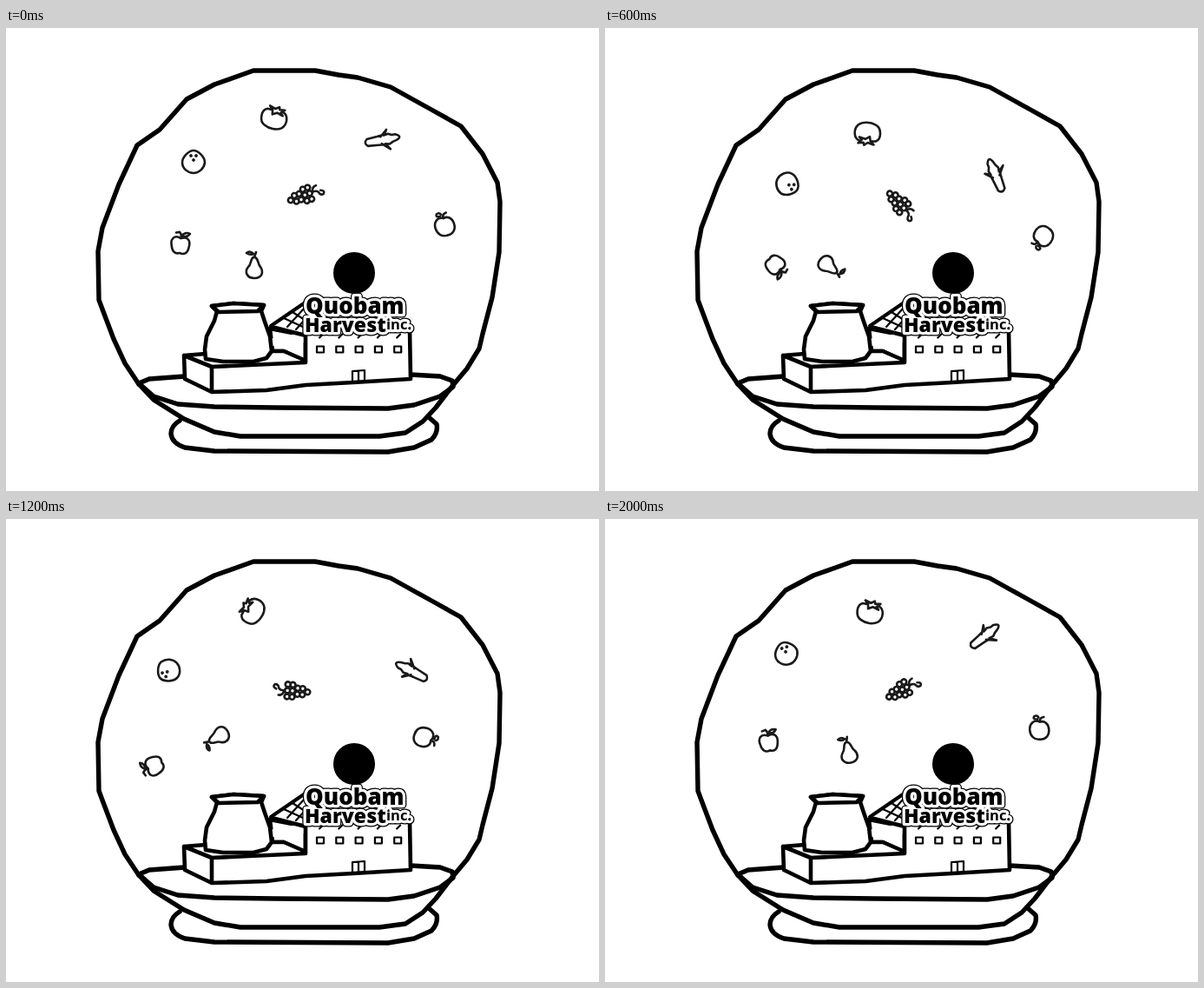
Recreate the animation shown at these times as an HTML page. Size 683 by 533 pixels, loop 2.2 s.

```html
<!DOCTYPE html>
<html lang="en">
<head>
<meta charset="utf-8">
<title>Snow globe</title>
<style>
  html, body { margin: 0; width: 100%; height: 100%; overflow: hidden; background: #fff; }
  svg { display: block; width: 100%; height: 100%; fill: none; stroke: #000;
        stroke-linecap: round; stroke-linejoin: round; }
  .globe { stroke-width: 5.4; }
  .factory { stroke-width: 4.6; fill: #fff; }
  .detail { stroke-width: 2.2; }
  .fruit { stroke-width: 2.6; stroke: #1a1a1a; }
  .sign { font: 800 26px "Open Sans", sans-serif; }
  .halo { stroke-width: 9; }
  .gap { stroke: #fff; stroke-width: 6.5; }
  .ink { stroke: none; fill: #000; }
</style>
</head>
<body>
<svg viewBox="0 0 683 533">
  <g class="globe">
    <path d="M153 410L137 386L124 358L113 329L107 313L106 257L111 230L130 180L151 135L177 117L208 82L240 65L285 49H356L383 54L405 57L443 68L490 94L524 113L549 145L566 178L569 200L568 258L560 310L549 352L545 369L531 392L515 411"/>
    <path d="M206 401L165 404L153 409L170 424L198 433L240 436L310 437L440 438L470 434L500 424L515 413L514 406L500 401L466 399"/>
    <path d="M153 410L170 428L205 450L240 465L270 470H430L460 466L480 453L495 437L515 411"/>
    <path d="M200 452Q190 458 190 467Q191 478 206 483L240 487L440 488L470 483L490 474Q498 466 496 456L488 449"/>
  </g>

  <g class="factory">
    <path d="M304 346L345 354V384L320 372H307Z"/>
    <path d="M205 377L230 374L308 372H320L345 384V350H465V404L400 408L345 410L300 417L237 419L206 404Z" stroke="none"/>
    <path d="M230 375L205 377L206 404L237 419L300 417L345 411L400 408L466 404L465 348M345 350V385L237 390L205 377M237 390V419M307 372H320L343 382M304 346L310 345L345 354"/>
    <path d="M243 326L240 337L231 355L229 370L230 381L250 384H285L300 380L306 372L304 355L298 338L294 326L297 319L262 317L237 320Z"/>
    <path d="M237 320L262 317L297 319L290 326L245 327Z"/>
  </g>
  <g class="detail">
    <path d="M305 343L343 317" stroke-width="4"/>
    <path d="M320 334L344 345M330 327L344 336M324 344L344 322M334 347L344 336"/>
    <path d="M399 407V395L413 394V406M406 395V407"/>
    <path id="windows"/>
  </g>

  <defs>
    <g id="lettering" class="sign">
      <text x="345" y="329">Quobam</text>
      <text x="344" y="350" font-size="23">Harvest</text>
      <text x="438" y="347" font-size="16.5" font-weight="700">inc.</text>
    </g>
  </defs>
  <use href="#lettering" class="halo"/>
  <use href="#lettering" class="gap"/>
  <use href="#lettering" class="ink"/>
  <circle class="ink" cx="401" cy="282" r="24"/>
  <g id="produce" class="fruit"></g>
</svg>
<script>
  const STEP_MS = 200, STEPS = 11;

  const dot = (x, y, r) => `M${x - r} ${y}a${r} ${r} 0 1 0 ${2 * r} 0a${r} ${r} 0 1 0 ${-2 * r} 0`;

  // A square window with a short tick above it, five times.
  let windows = '';
  for (let i = 0; i < 5; i++) windows += `M${358 + 22.3 * i} 366.5h8v7h-8zm3-10l4-4`;
  document.getElementById('windows').setAttribute('d', windows);

  function bunch() {
    let berries = '';
    [3, 3, 2, 2, 1].forEach((count, row) => {
      for (let i = 0; i < count; i++) berries += dot(7 * (i - (count - 1) / 2), 5.8 * row - 5, 3);
    });
    return berries;
  }

  const easeOut = power => u => 1 - (1 - u) ** power;
  const smooth = u => u * u * (3 - 2 * u);
  const thereAndBack = peak => u => u < peak ? u / peak : (1 - u) / (1 - peak);

  // Each fruit drifts round a closed curve through its path points
  // while turning by `turn` degrees from `angle`.
  const fruits = [
    { name: 'tomato', angle: 14, turn: 360, ease: easeOut(2),
      path: [[309, 103], [309, 121], [288, 118], [284, 103], [299, 113]],
      shape: 'M-10-8C-17-5-16 8-9 11C-3 14 6 14 11 10C17 4 15-6 9-8M-10-8L-4-8L-8-12L-1-10L3-13L4-10L10-11L6-7L9-4L2-6L-3-3L-4-8' },
    { name: 'corn', angle: 80, turn: -170, ease: thereAndBack(5 / 11),
      path: [[433, 129], [441, 159], [467, 184], [465, 170], [446, 150]],
      shape: 'M-5-3L-6-8L-4-12L-4-16Q0-25 3-16L4-12L6-8L5-3M-4 1L-11-7L-6-4L-5 5L-4 17Q0 22 4 17L5 5L6-4L12-8L4 1' },
    { name: 'peach', angle: -10, turn: -360, ease: easeOut(1.35),
      path: [[505, 226], [505, 238], [498, 246], [480, 254], [493, 260]],
      shape: 'M0-7C-7-10-12-4-11 3C-10 10-5 14 1 13C8 13 12 8 11 1C10-6 5-9 0-7Q-1-12 4-13M-3-10Q-9-9-7-13Q-4-15-2-12' },
    { name: 'grapes', angle: 70, turn: 360, ease: smooth,
      path: [[345, 192], [347, 203], [328, 202], [331, 197], [340, 202]],
      shape: bunch() + 'M0-8Q-1-13 2-15Q7-16 6-20Q3-23 1-18M-1-9Q-6-10-6-15' },
    { name: 'apple', angle: 5, turn: 360, ease: easeOut(1.4),
      path: [[201, 247], [205, 268], [181, 283], [166, 284], [172, 269]],
      shape: 'M0-5C-8-9-12-3-10 4C-9 11-5 14 0 12C5 14 9 12 10 5C12-4 7-8 0-5Q1-9-2-12L-6-11M1-8Q4-13 10-11Q7-6 1-8' },
    { name: 'pear', angle: 0, turn: 360, ease: easeOut(1.4),
      path: [[286, 272], [271, 279], [243, 267], [244, 249], [267, 256]],
      shape: 'M-1-8C-5-6-3 0-7 3C-12 9-8 16 0 16C9 16 11 9 7 3C4 0 5-6 1-8ZM0-8L2-14M-1-12Q-5-16-9-13Q-5-10-1-12' },
    { name: 'coconut', angle: 0, turn: 360, ease: easeOut(1.25),
      path: [[216, 154], [216, 174], [197, 185], [186, 170], [198, 160]],
      shape: 'M0-13C5-13 13-6 13 1C12 8 6 13 0 13C-6 13-13 8-13 1C-13-6-5-13 0-13Z' +
        dot(-3, -7, .6) + dot(3, -7, .6) + dot(0, -2, .6) }
  ];

  for (const fruit of fruits) {
    fruit.node = document.createElementNS('http://www.w3.org/2000/svg', 'path');
    fruit.node.setAttribute('d', fruit.shape);
    document.getElementById('produce').append(fruit.node);
  }

  // Closed Catmull-Rom curve, u in 0..1.
  function pointOnLoop(points, u) {
    const n = points.length, i = Math.floor(u * n), t = u * n - i;
    const [before, from, to, after] = [n - 1, 0, 1, 2].map(k => points[(i + k) % n]);
    return from.map((b, axis) => {
      const a = before[axis], c = to[axis], d = after[axis];
      return b + t / 2 * (c - a + t * (2 * a - 5 * b + 4 * c - d + t * (3 * (b - c) + d - a)));
    });
  }

  function draw() {
    const u = Math.floor(performance.now() / STEP_MS) % STEPS / STEPS;
    for (const { node, path, angle, turn, ease } of fruits) {
      const [x, y] = pointOnLoop(path, u);
      node.setAttribute('transform', `translate(${x} ${y}) rotate(${angle + turn * ease(u)})`);
    }
    requestAnimationFrame(draw);
  }
  draw();
</script>
</body>
</html>
```
